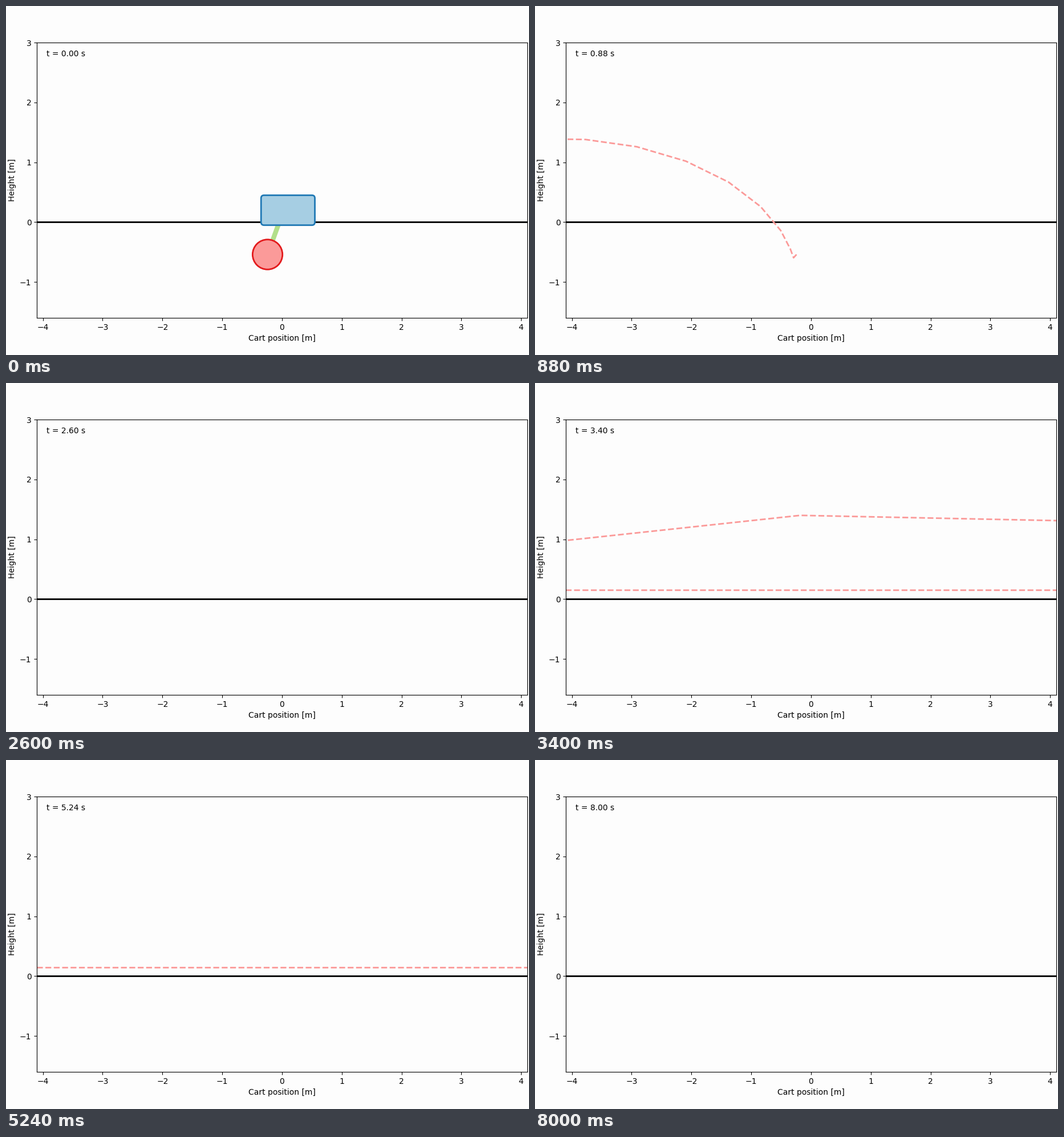
A matplotlib script for the animation above (8040 ms loop, 917 by 611 pixels).

```python
import numpy as np
import matplotlib.pyplot as plt
from matplotlib.animation import FuncAnimation
from matplotlib.patches import Circle, FancyBboxPatch

plt.rcParams["font.family"] = "DejaVu Sans"

W, H, DPI = 917, 611, 100
PAPER = "#fdfdfd"
FRAMES, DT, TRAIL = 201, 0.04, 50
LENGTH, PIVOT = 1.0, 0.4
CART_W, CART_H = 0.8, 0.4
RETURN, LAST = 67, 82  # steps at which the cart swings back right, then left

# The cart runs off to the left, races back through, then leaves for good
step = np.arange(FRAMES)
d = step - RETURN - 1
phase = [step < RETURN, step < LAST]
cart_x = np.select(
    phase,
    [0.1 - 0.51 * step + 0.11 * np.sin(np.pi * step / 9) ** 2,
     -0.18 + 16.8 * d + 10.8 * d ** 2],
    40 * (LAST + 0.5 - step))
theta = np.select(
    phase,
    [-0.349 + 0.456 * step - 0.00069 * step ** 3,
     np.pi + 1.1 * d],
    np.arccos(0.25))
ball_x = cart_x + LENGTH * np.sin(theta)
ball_y = PIVOT - LENGTH * np.cos(theta)

fig = plt.figure(figsize=(W / DPI, H / DPI), dpi=DPI, facecolor=PAPER)
ax = fig.add_axes([54.2 / W, 64.85 / H, 859.4 / W, 482.1 / H],
                  facecolor=PAPER)
ax.set_xlim(-4.1, 4.1)
ax.set_ylim(-1.6, 3)
ax.set_xticks(range(-4, 5))
ax.set_yticks(range(-1, 4))
ax.set_xlabel("Cart position [m]")
ax.set_ylabel("Height [m]")

ax.axhline(0, color="black", lw=2, zorder=1)
trail, = ax.plot([], [], "--", color="#fb9a99", lw=2, zorder=2)
rod, = ax.plot([], [], color="#b2df8a", lw=6, zorder=3)
cart = FancyBboxPatch((0, 0), CART_W, CART_H, boxstyle="round,pad=0.05",
                      fc="#a6cee3", ec="#1f78b4", lw=2, zorder=4)
ball = Circle((0, 0), 0.25, fc="#fb9a99", ec="#e31a1c", lw=2, zorder=5)
ax.add_patch(cart)
ax.add_patch(ball)
clock = ax.text(0.02, 0.95, "", transform=ax.transAxes)


def update(i):
    x, bx, by = cart_x[i], ball_x[i], ball_y[i]
    past = slice(max(0, i - TRAIL), i + 1)
    trail.set_data(ball_x[past], ball_y[past])
    rod.set_data([x, bx], [PIVOT, by])
    cart.set_x(x - CART_W / 2)
    ball.center = bx, by
    clock.set_text(f"t = {i * DT:.2f} s")
    return trail, rod, cart, ball, clock


anim = FuncAnimation(fig, update, frames=FRAMES, interval=DT * 1000,
                     repeat=True, repeat_delay=0, blit=False)
plt.show()
```
